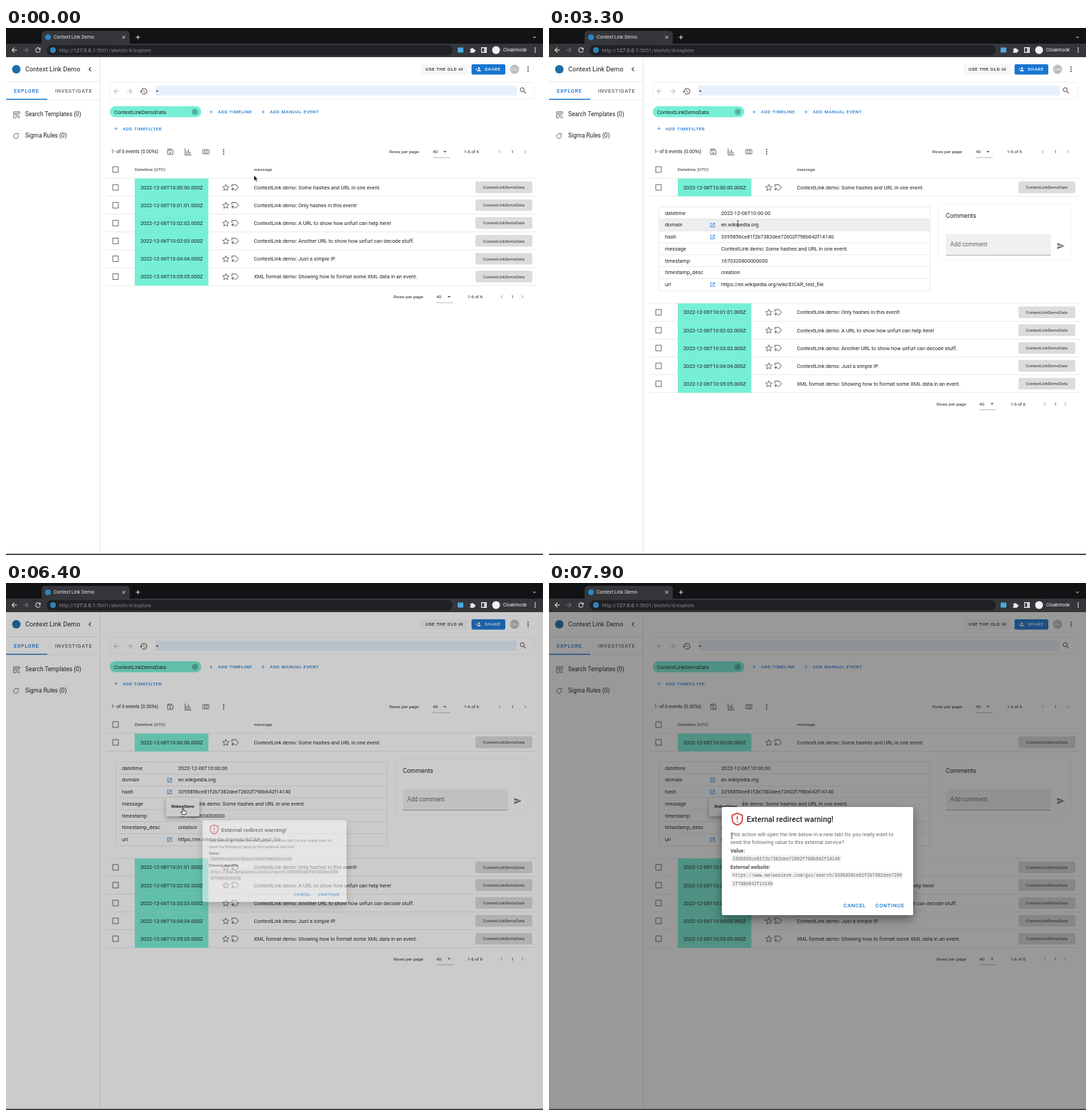
Write an HTML page that moves like this. It is 755 px wide and 741 px high and loops after 8 s.

```html
<!DOCTYPE html>
<html lang="en">
<head>
<meta charset="utf-8">
<title>Context Link Demo</title>
<style>
html, body { margin: 0; width: 100%; height: 100%; overflow: hidden; background: #fff; }
svg { display: block; width: 100vw; height: 100vh; }
text { font-family: Roboto, Arial, sans-serif; white-space: pre; }
.btn { font-weight: 500; letter-spacing: .09em; }
.mid { text-anchor: middle; }
.med { font-weight: 500; }
.bold { font-weight: 700; }
.body { letter-spacing: .009em; }
.code { font-family: "Liberation Mono", monospace; }
</style>
</head>
<body>
<svg id="stage" viewBox="0 0 755 741"></svg>
<script>
const INK = '#222', BLUE = '#1976d2', TEAL = '#76efd5', LINE = '#e5e5e5', GREY = '#555';
const LOOP = 8000, SHIFT = 150.6, ROW = 25.1;
const HASH = '3395856ce81f2b7382dee72602f798b642f14140';
const SERVICE = 'MalwoSieve';

// Icons on a 24-unit grid
const fills = {
  back: 'M20 11H7.8l5.6-5.6L12 4l-8 8 8 8 1.4-1.4L7.8 13H20z',
  forward: 'M12 4l-1.4 1.4 5.6 5.6H4v2h12.2l-5.6 5.6L12 20l8-8z',
  reload: 'M17.65 6.35A8 8 0 1 0 19.73 14h-2.08A6 6 0 1 1 12 6c1.66 0 3.14.69 4.22 1.78L13 11h7V4z',
  history: 'M13 3a9 9 0 0 0-9 9H1l3.9 3.9L9 12H6a7 7 0 1 1 2.06 4.94l-1.42 1.42A9 9 0 1 0 13 3zm-1 5v5l4.28 2.54.72-1.21-3.5-2.08V8z',
  search: 'M15.5 14h-.79l-.28-.27a6.5 6.5 0 1 0-.7.7l.27.28v.79l5 5 1.49-1.49zm-6 0a4.5 4.5 0 1 1 0-9 4.5 4.5 0 0 1 0 9z',
  left: 'M15.4 7.4 14 6l-6 6 6 6 1.4-1.4L10.8 12z',
  right: 'M8.6 16.6 13.2 12 8.6 7.4 10 6l6 6-6 6z',
  down: 'M7.4 8.6 12 13.2l4.6-4.6L18 10l-6 6-6-6z',
  dots: 'M12 8a2 2 0 1 0 0-4 2 2 0 0 0 0 4zm0 2a2 2 0 1 0 0 4 2 2 0 0 0 0-4zm0 6a2 2 0 1 0 0 4 2 2 0 0 0 0-4z',
  open: 'M19 19H5V5h7V3H3v18h18v-9h-2zM14 3v2h3.6l-9.8 9.8 1.4 1.4L19 6.4V10h2V3z',
  send: 'M2 21 23 12 2 3v7l15 2-15 2z',
  drop: 'M6 9l6 6 6-6z',
  plus: 'M19 13h-6v6h-2v-6H5v-2h6V5h2v6h6z',
  close: 'M19 6.4 17.6 5 12 10.6 6.4 5 5 6.4l5.6 5.6L5 17.6 6.4 19l5.6-5.6 5.6 5.6 1.4-1.4-5.6-5.6z',
  puzzle: 'M4 7h5a3 3 0 1 1 6 0h5v5a3 3 0 1 1 0 5v5H4v-5a3 3 0 1 0 0-6z',
  people: 'M15 12a4 4 0 1 0 0-8 4 4 0 0 0 0 8zm0 2c-3 0-8 1.3-8 4v2h16v-2c0-2.7-5-4-8-4zM5 8H3v3H0v2h3v3h2v-3h3v-2H5z'
};
const strokes = {
  box: 'M3 3h18v18H3z',
  star: 'M12 3.5l2.6 6 6.4.6-4.9 4.2 1.5 6.3-5.6-3.4-5.6 3.4 1.5-6.3L3 10.1l6.4-.6z',
  tag: 'M3 11V4h12l7 8-7 8h-4M1 17h9M5.5 12.5v9',
  save: 'M3 3h14l4 4v14H3zM7 3v5h8V3M12 12v6M9 15l3 3 3-3',
  chart: 'M3 2v20h19M8 10v9M13 5v14M18 12v7',
  columns: 'M2 5h20v14H2zM8.7 5v14M15.3 5v14',
  panel: 'M3 3h18v18H3zM14 3v18M17.5 3v18',
  report: 'M21 10V3H3v18h7M6 8h12M6 12h5M15 12a4 4 0 1 0 .1 0M18 19l4 4',
  sigma: 'M22 4H11a8 8 0 1 0 6 3',
  shield: 'M12 1.5 21 5v7c0 5-4 9-9 10.5C7 21 3 17 3 12V5zM12 7v6M12 15.5v2'
};

const text = (x, y, s, size, fill = INK, cls = '') =>
  `<text x="${x}" y="${y + size * .36}" font-size="${size}" fill="${fill}" class="${cls}">${s}</text>`;
const rect = (x, y, w, h, fill, r = 0, more = '') =>
  `<rect x="${x}" y="${y}" width="${w}" height="${h}" rx="${r}" fill="${fill}" ${more}/>`;
const dot = (x, y, r, fill, more = '') => `<circle cx="${x}" cy="${y}" r="${r}" fill="${fill}" ${more}/>`;
const hline = (x1, x2, y, c = LINE) => rect(x1, y - .4, x2 - x1, .8, c);
const icon = (name, x, y, size, c = GREY, w = 2) => {
  const paint = fills[name] ? `fill="${c}"` : `fill="none" stroke="${c}" stroke-width="${w}"`;
  return `<path d="${fills[name] || strokes[name]}" ${paint} transform="translate(${x - size / 2} ${y - size / 2}) scale(${size / 24})"/>`;
};
const group = (id, s, more = '') => `<g id="${id}" ${more}>${s}</g>`;
const shadow = (id, dy, blur, opacity) => `<filter id="${id}" x="-30%" y="-30%" width="160%" height="170%">` +
  `<feDropShadow dx="0" dy="${dy}" stdDeviation="${blur}" flood-opacity="${opacity}"/></filter>`;

function browser() {
  return rect(0, 0, 755, 41, '#121315') + rect(50, 4, 124, 24, '#35363a', 5) + rect(0, 22, 755, 19, '#35363a') +
    rect(57, 24, 571, 14.5, '#202124', 7) +
    dot(59, 13, 4, '#2c86bd') + text(67, 13, 'Context Link Demo', 6.77, '#e4e4e4') +
    icon('close', 165.5, 13, 8, '#ddd') + icon('plus', 185.5, 13, 10, '#eee') + icon('down', 743, 13, 9, '#ddd') +
    icon('back', 11.5, 31, 11, '#eee') + icon('forward', 28, 31, 11, '#777') + icon('reload', 45, 31, 11, '#eee') +
    dot(66, 31, 4, '#2c86bd') +
    text(74.5, 31, 'http://<tspan fill="#aaa">127.0.0.1</tspan>:5001/sketch/4/explore', 7.46, '#858585') +
    rect(635, 27.5, 8, 7, '#4ba9e0') + icon('puzzle', 655.5, 31, 9, '#eee') + icon('panel', 672, 31, 9, '#eee', 3) +
    dot(689, 31, 5.5, '#f1f1f1') + text(699, 31, 'Cloakmode', 6.6, '#eee') + icon('dots', 744, 31, 11, '#ddd');
}

function sidebar() {
  return dot(14.5, 58, 6, '#1c6fa8') + text(27, 58, 'Context Link Demo', 9.2) + icon('left', 118, 58, 12, INK) +
    hline(0, 132, 75.5) + text(11, 88, 'EXPLORE', 7.3, BLUE, 'btn') + text(69, 88, 'INVESTIGATE', 7.3, '#666', 'btn') +
    hline(0, 132, 101) + rect(0, 99.6, 58, 1.4, BLUE) +
    icon('report', 15, 122, 11) + text(27, 121.5, 'Search Templates (0)', 8.3) +
    icon('sigma', 14.5, 152, 10) + text(27, 151.5, 'Sigma Rules (0)', 8.3) +
    rect(132, 41, .9, 698, LINE);
}

function pager(y, [label, count, arrow, range, prev, page, next]) {
  return text(label, y, 'Rows per page:', 6.25) + text(count, y, '40', 6.25) + icon('drop', arrow, y, 9) +
    hline(count, count + 24, y + 8.2, '#aaa') + text(range, y, '1-6 of 6', 6.25) +
    icon('left', prev, y, 10, '#aaa') + text(page, y, '1', 6.25, INK, 'mid') + icon('right', next, y, 10, '#aaa');
}

function toolbar() {
  const link = (x, y, s) => icon('plus', x, y, 8, BLUE) + text(x + 9.5, y, s, 6.25, BLUE, 'btn');
  return rect(583, 51, 67, 14.5, '#f7f7f7', 2) + text(590, 58, 'USE THE OLD UI', 6.25, INK, 'btn') +
    rect(654.5, 51, 47.5, 14.5, BLUE, 2) + icon('people', 664, 58, 8, '#fff') + text(673, 58, 'SHARE', 6.25, '#fff', 'btn') +
    dot(715, 58, 6.5, '#bdbdbd') + text(715, 58, 'Dev', 6, '#eee', 'mid') + icon('dots', 734, 58, 12) +
    rect(146, 76.5, 597, 23.5, '#fff', 2, 'stroke="#ececec" stroke-width=".8"') + rect(210, 81, 508, 14, '#e9f0fb') +
    icon('back', 155, 89, 11, '#bbb') + icon('forward', 174, 89, 11, '#bbb') + icon('history', 193.5, 89, 12) +
    text(211, 89.5, '*', 8) + icon('search', 727, 88, 12) +
    rect(146, 110, 128.5, 15.5, TEAL, 7.7) + text(152, 118, 'ContextLinkDemoData', 7.3) +
    dot(265.5, 118, 4.5, '#58b9a4') + icon('plus', 265.5, 118, 5, '#2f6e62') +
    link(288.5, 118, 'ADD TIMELINE') + link(361.5, 118, 'ADD MANUAL EVENT') + link(154.5, 141.5, 'ADD TIMEFILTER') +
    text(148, 174, '1- of 6 events (0.009s)', 6.65) +
    icon('save', 231, 174, 10) + icon('chart', 256, 174, 11) + icon('columns', 281, 174, 10) + icon('dots', 306, 174, 12) +
    pager(174, [539, 600, 617, 644, 694, 712, 730]) +
    icon('box', 154, 199, 10.5) + text(181, 199, 'Datetime (UTC)', 6.25, GREY, 'med') +
    text(348.5, 199, 'message', 6.25, GREY, 'med') + hline(141, 746, 211.2);
}

const messages = ['ContextLink demo: Some hashes and URL in one event.', 'ContextLink demo: Only hashes in this event!',
  'ContextLink demo: A URL to show how unfurl can help here!', 'ContextLink demo: Another URL to show how unfurl can decode stuff.',
  'ContextLink demo: Just a simple IP.', 'XML format demo: Showing how to format some XML data in an event.'];

function eventRow(message, i) {
  const y = 224.1 + ROW * i;
  return hline(141, 746, y + 12.5) + rect(181, y - 12.5, 103.5, ROW + .1, TEAL) + icon('box', 154, y, 10.5) +
    text(189, y, `2022-12-06T10:0${i}:0${i}.000Z`, 7.3) + icon('star', 309, y, 12, GREY, 1.7) + icon('tag', 322, y, 11.5) +
    text(348.5, y, message, 7.3) + rect(660, y - 8.3, 80, 16.4, '#dcdcdc', 2) +
    text(699.8, y, 'ContextLinkDemoData', 5.85, '#333', 'mid');
}

function details() {
  const fields = [['datetime', '2022-12-06T10:00:00'], ['domain', 'en.wikipedia.org', 1], ['hash', HASH, 1],
    ['message', messages[0]], ['timestamp', '1670320800000000'], ['timestamp_desc', 'creation'],
    ['url', 'https://en.wikipedia.org/wiki/EICAR_test_file', 1]];
  const rows = fields.map(([name, value, link], i) => {
    const y = 260 + 16.77 * i;
    return text(163, y, name, 7.3) + text(242, y, value, 7.3) + (link ? icon('open', 230, y + .3, 8.5, BLUE) : '') +
      (i < 6 ? hline(154.5, 536, y + 8.5) : '');
  });
  return rect(154.5, 251.5, 381.5, 118, '#fff', 1, `stroke="${LINE}" stroke-width=".8"`) +
    rect(154.5, 0, 381.5, 16.3, '#eee', 0, 'id="fieldHover"') + rows.join('') +
    rect(547.5, 248, 186.5, 79, '#fff', 2, 'stroke="#f0f0f0" stroke-width=".8"') + text(558, 264, 'Comments', 8.7) +
    rect(558, 289.5, 147.5, 30, '#f0f0f0', 2) + hline(558, 705.5, 319.3, '#999') +
    text(564, 304, 'Add comment', 8.35, '#666') + icon('send', 719.5, 306.5, 12, '#777') +
    hline(141, 746, 387);
}

function dialog() {
  return rect(243, 315, 269, 152, '#fff', 2, 'filter="url(#deepShade)"') + icon('shield', 264.7, 332, 19, '#d32f2f') +
    `<g letter-spacing=".13">${text(278, 332.3, 'External redirect warning!', 10.4, INK, 'med')}</g>` +
    text(255, 353, 'This action will open the link below in a new tab! Do you really want to', 7.3, '#666', 'body') +
    text(255, 364.6, 'send the following value to this external service?', 7.3, '#666', 'body') +
    text(255, 376, 'Value:', 7.3, GREY, 'bold') + rect(256, 382.5, 155.5, 9.5, '#f2f2f2', 1.5) +
    text(258, 387.3, HASH, 6.31, '#666', 'code') + text(255, 399.5, 'External website:', 7.3, GREY, 'bold') +
    rect(256, 406, 242, 9.8, '#f2f2f2', 1.5) + rect(256, 418, 58.5, 9.8, '#f2f2f2', 1.5) +
    text(258, 411, `https://www.${SERVICE.toLowerCase()}.com/gui/search/${HASH.slice(0, 25)}`, 6.31, '#666', 'code') +
    text(258, 423, HASH.slice(25), 6.31, '#666', 'code') +
    text(414, 453, 'CANCEL', 7.3, BLUE, 'btn') + text(459, 453, 'CONTINUE', 7.3, BLUE, 'btn');
}

const cursorShapes = {
  arrow: '<path d="M0 0v8l1.9-1.7 1.4 3 1.3-.6-1.3-2.9h2.5z" fill="#111" stroke="#fff" stroke-width=".6"/>',
  hand: '<path d="M-.8 0Q0-1 .8 0v3l3 .8q.8.3.6 1.4L3.8 8.5H-1L-3.2 5q.5-1 1.5-.2l.9.8z" fill="#fff" stroke="#111" stroke-width=".8"/>',
  beam: '<path d="M-1.4-3.3Q0-3.3 0-2.4Q0-3.3 1.4-3.3M0-2.4v4.8M-1.4 3.3Q0 3.3 0 2.4Q0 3.3 1.4 3.3" fill="none" stroke="#222" stroke-width=".7"/>'
};

stage.innerHTML = `<defs>${shadow('shade', 2.5, 3, .35)}${shadow('deepShade', 6, 7, .4)}</defs>` +
  rect(0, 0, 755, 741, '#fff') + sidebar() + toolbar() +
  rect(141, 211.5, 607, 25, '#ebebeb', 0, 'id="rowHover"') + eventRow(messages[0], 0) +
  group('details', details()) +
  group('rest', messages.slice(1).map((m, i) => eventRow(m, i + 1)).join('') + pager(378, [545, 605, 623, 649, 697, 712, 726])) +
  dot(230, 293.6, 5.5, BLUE, 'id="focus" fill-opacity=".2"') +
  group('menu', rect(225, 302, 47, 26, '#fff', 2, 'filter="url(#shade)"') + text(248.5, 313.8, SERVICE, 5.9, INK, 'mid bold')) +
  group('tip', rect(197, 267, 67, 16.5, '#616161', 2) + text(230, 275.3, 'Context Lookup', 7.3, '#fff', 'mid'), 'opacity=".9"') +
  rect(0, 41, 755, 698, '#212121', 0, 'id="scrim"') + group('dialog', dialog()) +
  browser() + rect(0, 739.3, 755, 1.7, '#333') + group('pointer', '');

// Pointer hot spot: time, x, y
const path = [[0, 348.5, 207], [300, 348.5, 207], [900, 361, 224], [2050, 361, 224], [2700, 300, 262],
  [3200, 265.5, 274], [3450, 265.5, 274], [4100, 239.5, 293], [4400, 239.5, 293], [4700, 230, 293], [5250, 230, 293],
  [5750, 239.5, 314], [5900, 239.5, 314], [6250, 249, 317], [7200, 249, 317], [7800, 257, 356], [LOOP, 257, 356]];
const kinds = [[0, 'arrow'], [450, 'hand'], [2260, 'arrow'], [2800, 'beam'], [3650, 'arrow'], [4550, 'hand'],
  [6900, 'arrow'], [7500, 'beam']];

const el = id => document.getElementById(id);
const show = (id, on) => el(id).setAttribute('display', on ? 'inline' : 'none');
const within = (t, a, b) => t >= a && t < b;

function pointerAt(t) {
  const i = path.findIndex(p => p[0] > t), [t0, x0, y0] = path[i - 1], [t1, x1, y1] = path[i];
  const p = (t - t0) / (t1 - t0), e = p * p * (3 - 2 * p);
  return [x0 + (x1 - x0) * e, y0 + (y1 - y0) * e];
}

function draw(now) {
  const t = now % LOOP, [x, y] = pointerAt(t), expanded = t >= 1300;
  show('rowHover', within(y, 211.5, 236.5));
  show('details', expanded);
  el('rest').setAttribute('transform', `translate(0 ${expanded ? SHIFT : 0})`);

  const field = Math.floor((y - 251.8) / 16.77);
  show('fieldHover', expanded && field >= 0 && t < 5000);
  el('fieldHover').setAttribute('y', 252 + 16.77 * field);
  show('tip', within(t, 4620, 6300));
  show('focus', within(t, 5000, 6354));
  show('menu', t >= 5000);

  const p = Math.min(1, Math.max(0, (t - 6354) / 225)), e = 1 - (1 - p) ** 3, s = .5 + .5 * e;
  el('scrim').setAttribute('opacity', .46 * e);
  show('dialog', p > 0);
  el('dialog').setAttribute('opacity', e);
  el('dialog').setAttribute('transform', `translate(377.5 391) scale(${s}) translate(-377.5 -391)`);

  const kind = kinds.findLast(k => k[0] <= t)[1], pointer = el('pointer');
  if (pointer.dataset.kind !== kind) {
    pointer.dataset.kind = kind;
    pointer.innerHTML = cursorShapes[kind];
  }
  pointer.setAttribute('transform', `translate(${x} ${y})`);
}

const start = performance.now();
function tick() {
  draw(performance.now() - start);
  requestAnimationFrame(tick);
}
tick();
</script>
</body>
</html>
```
